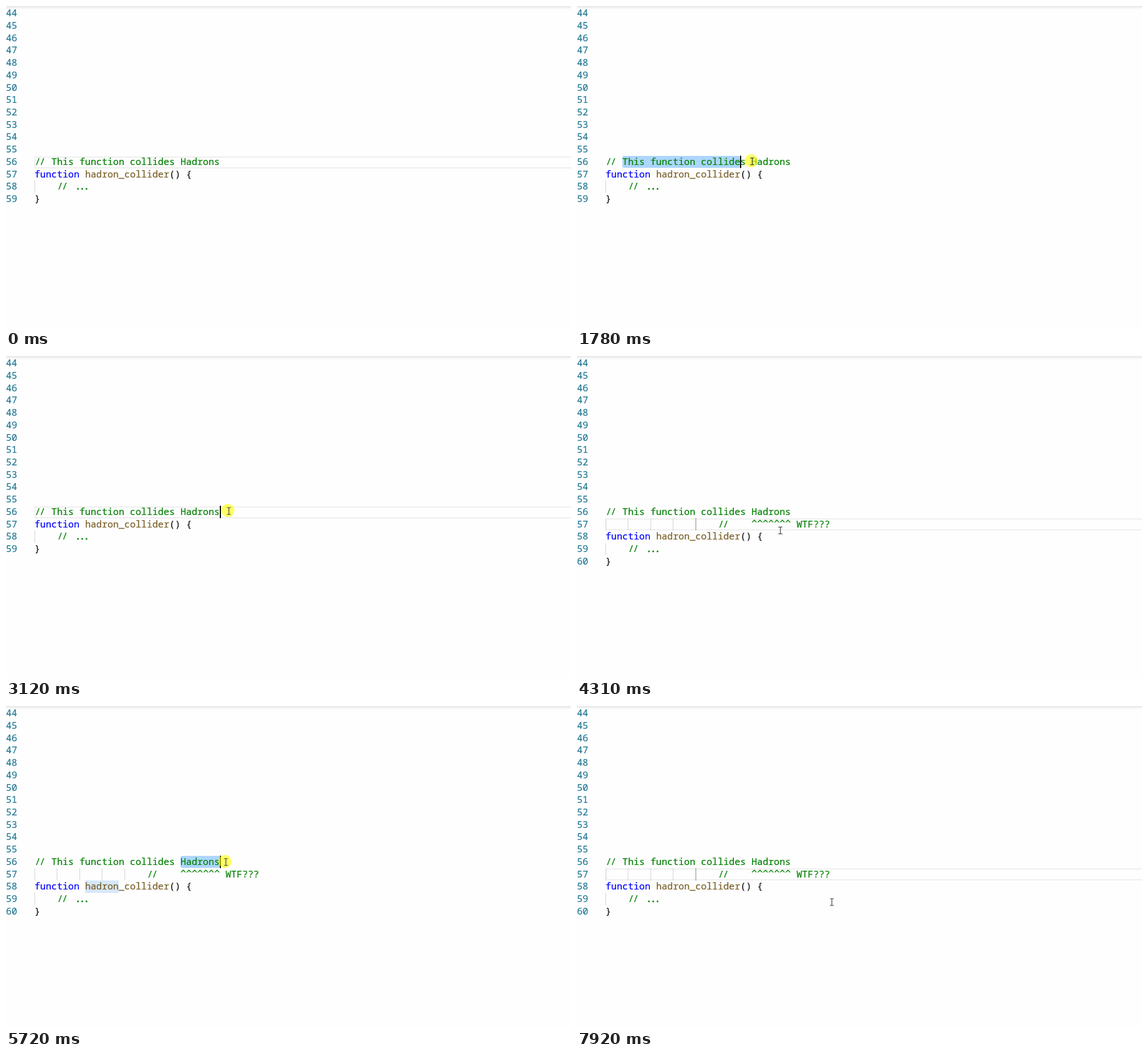
An HTML page that plays this animation: 991 px wide and 565 px high, repeating every 8 s.

```html
<!DOCTYPE html>
<html lang="en">
<head>
<meta charset="utf-8">
<title>Code editor</title>
<style>
  html, body { margin: 0; width: 100%; height: 100%; overflow: hidden; background: #fefefe; }
  svg { display: block; width: 991px; height: 565px; }
  text { font: 16.417px "Noto Sans Mono", monospace; white-space: pre; stroke-width: 0.2px; }
  .marks { font-family: "DejaVu Sans Mono", monospace; font-size: 16.35px; }
  .dots { stroke-width: 0.9px; }
</style>
</head>
<body>
<svg id="stage" viewBox="0 0 991 565">
  <defs>
    <linearGradient id="shade" x2="0" y2="1">
      <stop offset="0" stop-color="#e6e6e6"/>
      <stop offset="1" stop-color="#fefefe"/>
    </linearGradient>
  </defs>
  <rect width="991" height="565" fill="#fefefe"/>
  <rect width="991" height="6" fill="url(#shade)"/>
</svg>
<script>
const LOOP = 8000, LEFT = 50, CHAR = 9.85, PITCH = 21.72;
const GREEN = '#008000', BLUE = '#0000ff', BROWN = '#795e26', INK = '#111111', TEAL = '#237893';
const LINE_END = 33, NOTE_END = 40, WORD = 26;
const BLINK = 450, LAG = 52;
const INSERT = 3590, DOWN = 7460;
const DRAG = [1220, 2410], CLICK = [3040, 3200], DRAG2 = [5000, 5870];
const stage = document.getElementById('stage');

const colX = c => LEFT + c * CHAR;
const rowY = r => 262.7 + (r - 56) * PITCH;

function set(el, attrs) {
  for (const k in attrs) el.setAttribute(k, attrs[k]);
}
function add(parent, tag, attrs = {}) {
  const el = document.createElementNS('http://www.w3.org/2000/svg', tag);
  set(el, attrs);
  return parent.appendChild(el);
}
function show(el, on) {
  el.style.display = on ? '' : 'none';
}
function write(parent, x, row, text, color, extra) {
  const el = add(parent, 'text', { x, y: rowY(row) + 16.2, fill: color, stroke: color, ...extra });
  el.textContent = text;
  return el;
}
const put = (parent, row, col, ...rest) => write(parent, colX(col), row, ...rest);

// Two slashes set close together, as a coding ligature
function slashes(parent, row, col) {
  put(parent, row, col, '//', GREEN, { dx: '0.7 -1.6' });
}
function guide(parent, row, col, fill = '#d3d3d3') {
  return add(parent, 'rect', { x: Math.round(colX(col)), y: rowY(row), width: 1, height: PITCH, fill });
}

const line = add(stage, 'rect', { x: 51, width: 960, height: 19, fill: 'none', stroke: '#eeeeee', 'stroke-width': 2 });
const sel = add(stage, 'rect', { y: rowY(56) + 0.3, height: 21, rx: 3, fill: '#add6ff' });
const match = add(stage, 'rect', { x: colX(9), y: rowY(58), height: PITCH, fill: '#d6e7fa' });

let lastNumber;
for (let n = 44; n <= 60; n++) lastNumber = write(stage, 0, n, String(n), TEAL);

slashes(stage, 56, 0);
put(stage, 56, 3, 'This function collides Hadrons', GREEN);

const note = add(stage, 'g');
for (let c = 0; c < 20; c += 4) guide(note, 57, c);
const active = guide(note, 57, 16, '#858585');
slashes(note, 57, 20);
put(note, 57, WORD, '^'.repeat(7), GREEN, { class: 'marks', dy: -1.5 });
put(note, 57, 34, 'WTF???', GREEN);

const code = add(stage, 'g');
put(code, 57, 0, 'function', BLUE);
put(code, 57, 9, 'hadron_collider', BROWN);
put(code, 57, 24, '() {', INK);
guide(code, 58, 0);
slashes(code, 58, 4);
put(code, 58, 7, '...', GREEN, { class: 'dots', dx: '2.3 -2.3 -2.3' });
put(code, 59, 0, '}', INK);

const caret = add(stage, 'rect', { width: 2, height: PITCH, fill: '#000' });
const halo = add(stage, 'circle', { r: 11.5, fill: '#ffff00', 'fill-opacity': 0.6 });
const mouse = add(stage, 'path', {
  d: 'M-3.5-6H-1Q0-6 0-5Q0-6 1-6H3.5M0-5V5M-3.5 6H-1Q0 6 0 5Q0 6 1 6H3.5',
  fill: 'none', stroke: '#3c3c3c', 'stroke-width': 1.2
});

// Where each hand movement ends: time, x, y
const stops = [
  [70, 707, 517], [840, 80, 275], [1440, 80, 274], [2140, 389, 272],
  [3280, 391, 272], [3420, 444, 331], [INSERT, 444, 331], [4380, 356, 306],
  [4850, 314, 273], [5130, 306, 273], [5437, 385, 273], [6030, 386, 274],
  [6390, 531.5, 343.5], [7310, 440, 352], [7640, 430, 376], [7920, 447, 344]
];
const easeOut = p => 1 - (1 - p) ** 2;

function mouseAt(t) {
  const i = stops.findIndex(s => t < s[0]);
  if (i < 1) return stops.at(i).slice(1);
  const [t0, x0, y0] = stops[i - 1], [t1, x1, y1] = stops[i];
  const p = easeOut((t - t0) / (t1 - t0));
  return [x0 + (x1 - x0) * p, y0 + (y1 - y0) * p];
}

// The dragged selection end trails the mouse a little
function dragCol(t, from) {
  const col = Math.round((mouseAt(t - LAG)[0] - LEFT) / CHAR);
  return Math.min(LINE_END, Math.max(from, col));
}

// Caret row, selection start and selection end
function caretAt(t) {
  if (t < CLICK[0]) return [56, 3, t < DRAG[1] ? dragCol(t, 3) : LINE_END];
  if (t < INSERT) return [56, LINE_END, LINE_END];
  if (t < DRAG2[0] || t >= DOWN) return [57, NOTE_END, NOTE_END];
  return [56, WORD, t < DRAG2[1] ? dragCol(t, WORD) : LINE_END];
}

const presses = [DRAG, CLICK, DRAG2];
const inputs = [...presses.flat(), INSERT, DOWN];
const held = t => presses.some(([a, b]) => t >= a && t < b);

// Solid while the button is held, otherwise blinking since the last input
function caretLit(t) {
  const last = Math.max(...inputs.filter(e => e <= t));
  return t >= DRAG[0] && (held(t) || (t - last) % (2 * BLINK) < BLINK);
}

function draw(t) {
  const [row, from, to] = caretAt(t);
  const size = t < DRAG[0] ? 0 : to - from;
  const inserted = t >= INSERT;

  show(line, size === 0);
  set(line, { y: Math.round(rowY(row)) + 2 });
  show(sel, size > 0);
  set(sel, { x: colX(from), width: size * CHAR });
  show(match, size > 0 && t >= DRAG2[0] && t < DRAG2[1]);
  set(match, { width: Math.min(size, 6) * CHAR });

  show(lastNumber, inserted);
  show(note, inserted);
  show(active, row === 57);
  set(code, { transform: `translate(0 ${inserted ? PITCH : 0})` });

  show(caret, caretLit(t));
  set(caret, { x: Math.floor(colX(to)), y: rowY(row) });

  const [x, y] = mouseAt(t);
  show(mouse, t >= stops[0][0]);
  set(mouse, { transform: `translate(${x} ${y})` });
  show(halo, held(t));
  set(halo, { cx: x - 1.8, cy: y - 1 });
}

let start;
function tick(now) {
  start ??= now;
  draw((now - start) % LOOP);
  requestAnimationFrame(tick);
}
draw(0);
requestAnimationFrame(tick);
</script>
</body>
</html>
```
